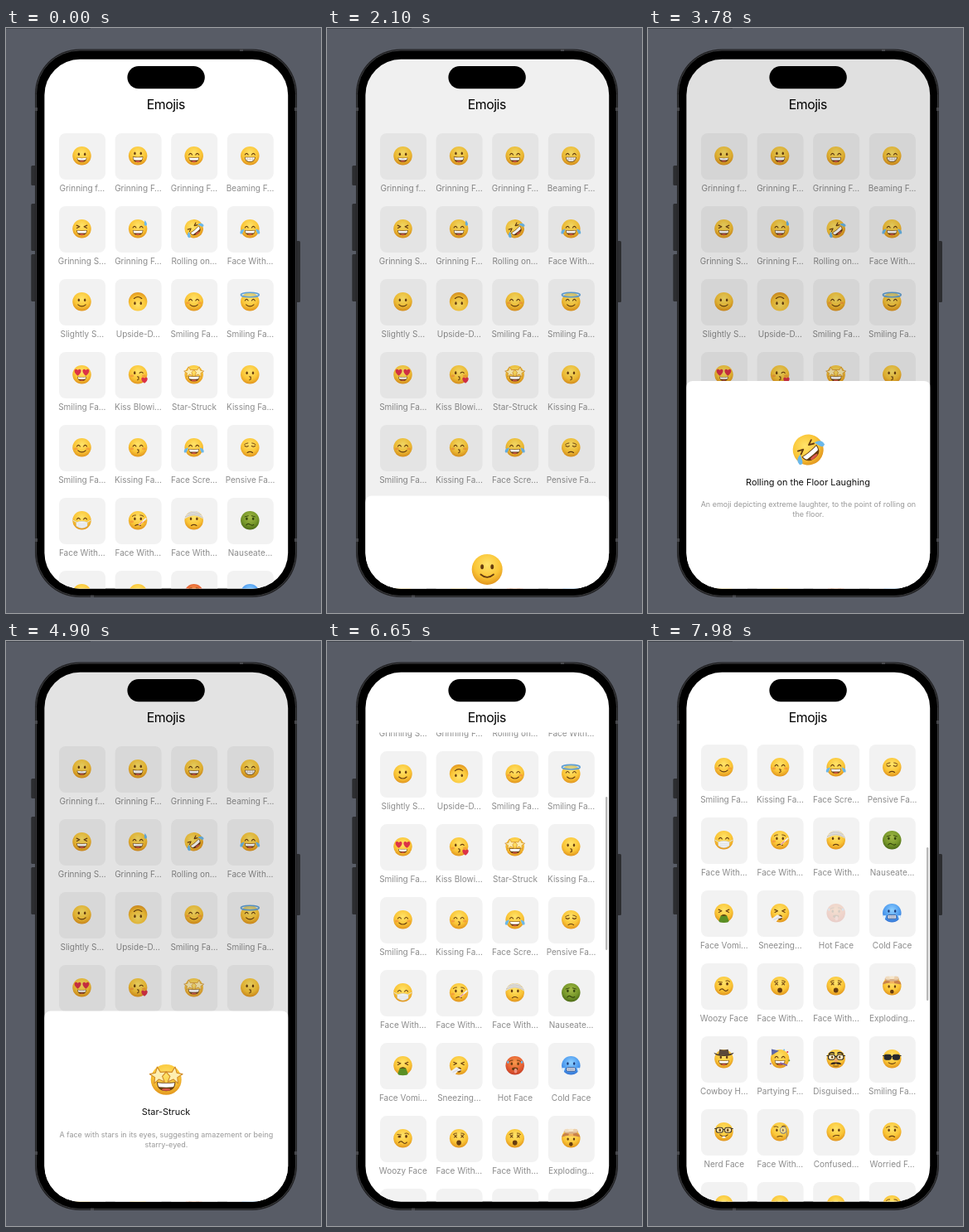
An HTML page for the animation above (8000 ms loop, 380 by 706 pixels).

```html
<!DOCTYPE html>
<html lang="en">
<head>
<meta charset="utf-8">
<title>Emojis</title>
<style>
html, body { margin: 0; width: 100%; height: 100%; overflow: hidden; background: #585c66; }
svg { display: block; }
text { font-family: Inter, Roboto, sans-serif; text-anchor: middle; }
.label { font-size: 10px; fill: #8b8b8b; }
.name { font-size: 10.9px; fill: #111; }
.desc { font-size: 9px; fill: #999; }
</style>
</head>
<body>
<svg id="stage" width="380" height="706" viewBox="0 0 380 706"></svg>
<script>
const LOOP = 8000, OPEN_TOP = 426, BOTTOM = 677;
const INK = '#663c10', BLUE = '#6bb8ea', RED = '#dc3247';

// Shape helpers; faces are drawn around 0,0 with radius 11
const el = (x, y, rx, ry, fill = INK) => `<ellipse cx="${x}" cy="${y}" rx="${rx}" ry="${ry}" fill="${fill}"/>`;
const fl = (d, fill = INK) => `<path d="${d}" fill="${fill}"/>`;
const ln = (d, color = INK, w = 1.1) =>
  `<path d="${d}" fill="none" stroke="${color}" stroke-width="${w}" stroke-linecap="round" stroke-linejoin="round"/>`;
const at = (s, move) => `<g transform="${move}">${s}</g>`;
const two = s => s + at(s, 'scale(-1 1)');
const face = (id = 'yellow') => `<circle r="11" fill="url(#${id})"/>`;
const heart = (x, y, k) => at(fl('M0 3C-5-.5-2.5-4.5 0-1.8C2.5-4.5 5-.5 0 3', RED), `translate(${x} ${y}) scale(${k})`);

const eyes = two(el(3.6, -1.9, 1.15, 1.8));
const happy = two(ln('M2.1-1.2Q4-4.4 5.9-1.2'));
const shut = two(ln('M2-1.8Q4 0 6-1.8'));
const squint = two(ln('M6.2-4L2.6-2.4L6-.8'));
const cross = two(ln('M2.6-4L5.4-1.2M5.4-4L2.6-1.2', INK, 1));
const brows = two(ln('M2.6-6.2Q4.8-6.4 6.6-4.8', INK, .9));
const grin = fl('M-6.2 1.8Q0 2.6 6.2 1.8Q6 7.8 0 7.8T-6.2 1.8') + el(0, 6.8, 2.8, .8, '#d8564a') +
  fl('M-5.6 2.3Q0 3 5.6 2.3Q5.3 4.9 4.4 5.1Q0 5.5-4.4 5.1Q-5.3 4.9-5.6 2.3', '#fff');
const beam = fl('M-6.4 1.4H6.4Q6 7.4 0 7.4T-6.4 1.4') + fl('M-5.7 2H5.7Q5.2 6.7 0 6.7T-5.7 2', '#fff') +
  ln('M-5.4 4.2H5.4M-3 2V6.2M0 2V6.6M3 2V6.2', '#b9a58c', .4);
const smile = ln('M-4.6 3.6Q0 7.6 4.6 3.6');
const frown = ln('M-3.2 6.2Q0 4 3.2 6.2');
const kiss = ln('M-.6 2.4Q2.2 2.8.5 4.3Q2.4 5.3-.6 6.4', INK, 1);
const blush = two(el(7, 1.6, 2.2, 1.5, '#ee6a3a66'));
const tears = two(fl('M6.6.2Q12.4 1 11.6 5.6Q9.4 7.4 8.2 4.4Z', BLUE));
const gasp = el(0, 5.2, 2.8, 3);
const star = two(at(`<path d="M0-4L1.2-1.3 4-1.1 1.8.8 2.5 3.6 0 2-2.5 3.6-1.8.8-4-1.1-1.2-1.3Z"
  fill="#fdeeb0" stroke="#d08a26" stroke-width=".45" stroke-linejoin="round"/>`, 'translate(5.6 -3.2) rotate(8) scale(1.5)'));
const lenses = (fill, stroke) => two(`<rect x="1" y="-4.8" width="8" height="5.8" rx="2.4" fill="${fill}" stroke="${stroke}" stroke-width="1.1"/>`) +
  ln('M-10.6-3.6H-9M-1-2.6H1M9-3.6H10.6', stroke);

const joy = face() + happy + grin + tears;
const blushing = face() + blush + happy + smile;
const dizzy = face() + cross + brows + gasp;
const sad = face() + eyes + brows + frown;

const EMOJIS = [
  ['Grinning f…', face() + eyes + at(grin, 'translate(0 .6) scale(.94 .86)')],
  ['Grinning F…', face() + at(eyes, 'translate(0 -1)') + at(grin, 'translate(0 -1) scale(1 1.15)')],
  ['Grinning F…', face() + happy + grin],
  ['Beaming F…', face() + happy + beam],
  ['Grinning S…', face() + squint + grin],
  ['Grinning F…', face() + happy + grin + fl('M8.4-10Q12.4-4.4 9.4-3.4Q6.2-3.4 8.4-10', BLUE)],
  ['Rolling on…', at(face() + squint + at(grin, 'translate(0 -1) scale(1.12)') + at(tears, 'translate(0 -1.2)'), 'rotate(-40)')],
  ['Face With…', joy],
  ['Slightly S…', face() + eyes + smile],
  ['Upside-D…', at(face() + eyes + smile, 'rotate(180)')],
  ['Smiling Fa…', blushing],
  ['Smiling Fa…', face() + happy + smile + `<ellipse cy="-8" rx="10.8" ry="2.7" fill="#8cc8f044" stroke="#5f9fd4" stroke-width="1.5"/>`],
  ['Smiling Fa…', face() + at(grin, 'translate(0 1) scale(.85)') + heart(-4.8, -2.6, 1.35) + heart(4.8, -2.6, 1.35)],
  ['Kiss Blowi…', face() + blush + el(-3.8, -2, 1.15, 1.8) + ln('M2-1.8Q4-4 6-1.8') + kiss + heart(7.8, 6.6, 1.25)],
  ['Star-Struck', face() + at(grin, 'translate(0 -.2) scale(1.08)') + star],
  ['Kissing Fa…', face() + eyes + kiss],
  ['Smiling Fa…', blushing],
  ['Kissing Fa…', face() + blush + happy + kiss],
  ['Face Scre…', joy],
  ['Pensive Fa…', face() + shut + two(ln('M2.4-5.2Q4.6-5.2 6.6-3.4', INK, .9)) + frown],
  ['Face With…', face() + happy + ln('M-10.4 0L-6 2.4M10.4 0L6 2.4', '#dfe6ea', .9) + fl('M-6.4 2.2Q0 0 6.4 2.2V6.8Q0 11.6-6.4 6.8Z', '#f1f3f5') +
    ln('M-6.4 2.2Q0 0 6.4 2.2V6.8Q0 11.6-6.4 6.8ZM-4.6 4.4H4.6M-4.6 6.6H4.6', '#c3c9cf', .5)],
  ['Face With…', face() + blush + eyes + brows + frown + ln('M1.6 5L9.4-2', '#f2f0ec', 1.8) + ln('M1.6 5L5 2', RED, .8)],
  ['Face With…', face() + eyes + frown + fl('M-10.9-1.6A11 11 0 0 1 10.9-1.6Q5-5.6 0-5.6T-10.9-1.6', '#e2e0dc') +
    ln('M-10-4.4Q0-9.6 10-3.6M-7-7.8Q0-11 8-6.6', '#bab7b2', .6)],
  ['Nauseate…', face('green') + two(el(3.8, -2, 1.2, 1.7, '#33440c')) + two(ln('M2-5.4L6-4.2', '#33440c', .9)) + ln('M-4.4 5.6Q-2.6 3 0 4.8T4.4 5', '#33440c')],
  ['Face Vomi…', face() + squint + fl('M-3.6 3Q0 1.2 3.6 3L6 9.4Q6 11.6 0 11.6T-6 9.4Z', '#5a8f24') + fl('M-3.6 3.4Q0 .2 3.6 3.4Z')],
  ['Sneezing…', face() + squint + gasp + fl('M-3 2L3.6 5.4L-1.6 7L-5 11.4L-10.4 7.4Z', '#f0f0f2') + ln('M-1 5L-7 8', '#c2c6cc', .6)],
  ['Hot Face', face('red') + two(el(3.8, -2, 1.2, 1.7)) + brows + el(0, 4, 3.6, 1.8) + el(.8, 6.2, 1.9, 2.7, '#f0907e') + two(el(8.2, -4, 1.1, 1.7, BLUE))],
  ['Cold Face', face('ice') + two(el(3.8, -2.2, 1.2, 1.7, '#1d3a78')) + `<rect x="-5.2" y="2.4" width="10.4" height="4.4" rx="1.4" fill="#fff" stroke="#1d3a78" stroke-width=".7"/>` +
    ln('M-4.6 4.6H4.6M-2.4 2.8V6.4M0 2.8V6.4M2.4 2.8V6.4', '#1d3a78', .4) + two(fl('M7 3L10.6 3L8.8 9.4Z', '#dff2ff'))],
  ['Woozy Face', face() + el(-4, -2, 1.8, 1.3) + el(4, -2.4, 1.4, 1.8) + ln('M-6.4-4.6L-2-4.2M2.4-6Q5-7 7-5', INK, .9) + ln('M-4.8 5Q-2.4 2.2 0 4.8T4.8 4.6')],
  ['Face With…', dizzy],
  ['Face With…', dizzy],
  ['Exploding…', face() + fl('M-10.9-1.6Q-5-4 0-3.4T10.9-1.6Q9.6-8 0-8T-10.9-1.6', '#c9824a') + fl('M-3-2.6L-2-8H2L3-2.6Z', '#f3b45c') +
    el(0, -8, 8.6, 2.6, '#d9b088') + el(-4.4, -9.4, 3.6, 2, '#f0dcc0') + el(4.4, -9.4, 3.6, 2, '#ecd0ac') + el(0, -9.8, 3, 1.8, '#f6e6cc') +
    two(el(3.6, .8, 1.2, 1.7)) + el(0, 6.8, 2.2, 2.4)],
  ['Cowboy H…', face() + eyes + grin + fl('M-12-7.4Q-6-4.4 0-4.8T12-7.4Q10-3.2 0-3.2T-12-7.4', '#4a3a2e') + fl('M-6.4-5L-5-11.2Q0-9.6 5-11.2L6.4-5Q0-3.8-6.4-5', '#5a483a')],
  ['Partying F…', face() + happy + grin + fl('M-9.6-4L-10-11.4L-1-9.6Z', '#5d67a8') + ln('M1 5L8 7.6', '#8567a8', 1.8) +
    el(9, -8, 1, 1, RED) + el(5, -10.6, .9, .9, BLUE) + el(11, 2, 1, 1, '#5da32b') + el(-11, 6, 1, 1, '#8567a8')],
  ['Disguised…', face() + two(ln('M2.2-6.6Q5-8.4 8-6', '#2c2420', 1.6)) + lenses('#fff0cc', '#2c2420') + two(el(4.4, -2, 1.1, 1.4)) +
    el(0, 1.8, 2, 2.4, '#f0a868') + fl('M0 4.2Q5 3 6.6 6.4Q3 7.4 0 5.6Q-3 7.4-6.6 6.4Q-5 3 0 4.2', '#3a2a20') + ln('M-3 8.4Q0 9.4 3 8.4', INK, .8)],
  ['Smiling Fa…', face() + lenses('#26282c', '#26282c') + ln('M-4 4.6Q0 7.6 4 4.6')],
  ['Nerd Face', face() + lenses('#fbe4a0', '#3d332a') + two(el(4.6, -2, 1.2, 1.7)) + smile + fl('M-1.8 5.4H1.8V7.4H-1.8Z', '#fff')],
  ['Face With…', face() + eyes + ln('M-7-6Q-4.4-7-2-5.4M2.4-6.4Q5-8 7-6.2', INK, .9) + '<circle cx="4" cy="-1.8" r="3.7" fill="#ffffff55" stroke="#7d7d83"/>' +
    ln('M7.8-.4Q9.4 4 7.6 9.6', '#7d7d83', .7) + ln('M-3 6Q0 4.6 3 5.6')],
  ['Confused…', face() + eyes + ln('M-3.4 5.6Q0 3.6 3.8 4.6')],
  ['Worried F…', sad],
  ['Frowning…', face() + eyes + frown],
  ['Slightly F…', face() + eyes + frown],
  ['Face With…', face() + eyes + gasp],
  ['Anguished…', sad]
];

const SHEETS = [
  { emoji: 8, name: 'Slightly Smiling Face', lines: ['A face with a slight smile, showing mild happiness.'],
    tap: 910, open: 1020, drag: 1880, drop: 2100, left: .455 },
  { emoji: 6, name: 'Rolling on the Floor Laughing',
    lines: ['An emoji depicting extreme laughter, to the point of rolling on', 'the floor.'],
    tap: 3080, open: 3280, drag: 3880, drop: 4000, left: .45 },
  { emoji: 14, name: 'Star-Struck', lines: ['A face with stars in its eyes, suggesting amazement or being', 'starry-eyed.'],
    tap: 4690, open: 4738, drag: 5240, drop: 5460, left: .303 }
];
const TAPS = [...SHEETS.map(s => ({ emoji: s.emoji, down: s.tap, up: s.open - 20 })), { emoji: 26, down: 7970, up: LOOP }];

const ball = (id, a, b, c) => `<radialGradient id="${id}" cx=".5" cy=".34" r=".7">
  <stop offset="0" stop-color="${a}"/><stop offset=".6" stop-color="${b}"/><stop offset="1" stop-color="${c}"/></radialGradient>`;
const use = (i, x, y, k) => `<use href="#e${i}" transform="translate(${x} ${y}) scale(${k})"/>`;
const rect = (x, y, w, h, r, fill, more = '') => `<rect x="${x}" y="${y}" width="${w}" height="${h}" rx="${r}" fill="${fill}" ${more}/>`;

const cells = EMOJIS.map(([label], i) => {
  const x = 64 + (i % 4) * 67.6, y = 127 + Math.floor(i / 4) * 88;
  return rect(x, y, 56, 56, 8, '#f2f2f2') + `<g id="c${i}">${use(i, x + 27.5, y + 27.2, 1.02)}</g>` +
    `<text class="label" x="${x + 27.8}" y="${y + 69.8}">${label}</text>`;
}).join('');

const pages = SHEETS.map((s, i) => {
  const y = s.lines.length > 1 ? 0 : 6;
  return `<g id="p${i}">${use(s.emoji, 193.2, 83 + y, 1.68)}<text class="name" x="193" y="${125.6 + y}">${s.name}</text>` +
    s.lines.map((l, n) => `<text class="desc" x="193.4" y="${152.2 + y + n * 12}">${l}</text>`).join('') + '</g>';
}).join('');

const stage = document.getElementById('stage');
stage.innerHTML = `<defs>
  ${ball('yellow', '#ffe36a', '#fac536', '#dd8d1a')}${ball('green', '#a3ba48', '#759628', '#466414')}
  ${ball('red', '#f79a4c', '#e55f32', '#bf3a26')}${ball('ice', '#8fd0ff', '#4f9df0', '#2f6fd0')}
  <clipPath id="screen">${rect(46.4, 37.8, 293.8, 638.8, 43, '#000')}</clipPath>
  <clipPath id="list"><rect x="46" y="110.5" width="295" height="570"/></clipPath>
  ${EMOJIS.map(([, art], i) => `<g id="e${i}">${art}</g>`).join('')}
</defs>
${rect(0, 0, 380, 706, 0, '#585c66')}${rect(0, 0, 102, 1, 0, '#43464e')}
${[[166, 24], [212, 57], [273, 57]].map(([y, h]) => rect(30.3, y, 6, h, 1.5, '#2c2d30')).join('')}
${rect(349, 257, 6, 74, 1.5, '#2c2d30')}
${rect(35, 25.5, 316, 661.5, 54, '#202022')}
${rect(36.5, 27, 313, 658.5, 52.5, '#000', 'stroke="#3c3d40"')}
${[[35, 96], [348, 96], [35, 616], [348, 616]].map(([x, y]) => rect(x, y, 3, 4, 0, '#46474b')).join('')}
${rect(282, 25.5, 4, 2.5, 0, '#46474b')}${rect(102, 684.5, 4, 2.5, 0, '#46474b')}
<g clip-path="url(#screen)">
  ${rect(46, 37, 295, 640, 0, '#fff')}
  <g clip-path="url(#list)"><g id="grid">${cells}</g></g>
  <text x="192.8" y="97.8" font-size="15.8" letter-spacing="-.45">Emojis</text>
  ${rect(336, 0, 2.4, 185, 1.2, '#b8b8b8', 'id="bar"')}
  ${rect(46, 37, 295, 640, 0, '#000', 'id="dim"')}
  <g id="sheet">${rect(46, 0, 295, 300, 8, '#fff')}${pages}</g>
</g>
${rect(146.4, 46, 93.4, 27.2, 13.6, '#000')}`;

const $ = id => document.getElementById(id);
const grid = $('grid'), bar = $('bar'), dim = $('dim'), sheet = $('sheet');
const span = (t, a, b) => Math.min(1, Math.max(0, (t - a) / (b - a)));
const expoOut = u => u >= 1 ? 1 : 1 - 2 ** (-10 * u);
const cubicOut = u => 1 - (1 - u) ** 3;
const cubicInOut = u => u < .5 ? 4 * u ** 3 : 1 - 4 * (1 - u) ** 3;

// 0 = hidden, 1 = fully open: springs up, is dragged down, then let go
function openness(s, t) {
  if (t >= s.drop) return s.left * (1 - expoOut(span(t, s.drop, s.drop + 480)));
  if (t >= s.drag) return 1 - (1 - s.left) * span(t, s.drag, s.drop) ** 1.4;
  return expoOut(span(t, s.open, s.open + 450));
}

function draw(t) {
  const scroll = 177 * cubicInOut(span(t, 6400, 6720)) + 177 * cubicOut(span(t, 6830, 7350));
  grid.setAttribute('transform', `translate(0 ${-scroll})`);
  bar.setAttribute('y', 131.7 + scroll * .3315);
  bar.setAttribute('opacity', span(t, 6400, 6480));

  let p = 0;
  SHEETS.forEach((s, i) => {
    const v = t < s.open ? 0 : openness(s, t);
    $('p' + i).style.display = v ? '' : 'none';
    p = Math.max(p, v);
  });
  sheet.style.display = p ? '' : 'none';
  sheet.setAttribute('transform', `translate(0 ${BOTTOM - (BOTTOM - OPEN_TOP) * p})`);
  dim.setAttribute('opacity', .12 * p ** .85);

  for (const { emoji, down, up } of TAPS)
    $('c' + emoji).setAttribute('opacity', t < down ? 1 : .2 + .8 * cubicInOut(span(t, up, up + 250)));
}

function tick() {
  draw(performance.now() % LOOP);
  requestAnimationFrame(tick);
}
tick();
</script>
</body>
</html>
```
